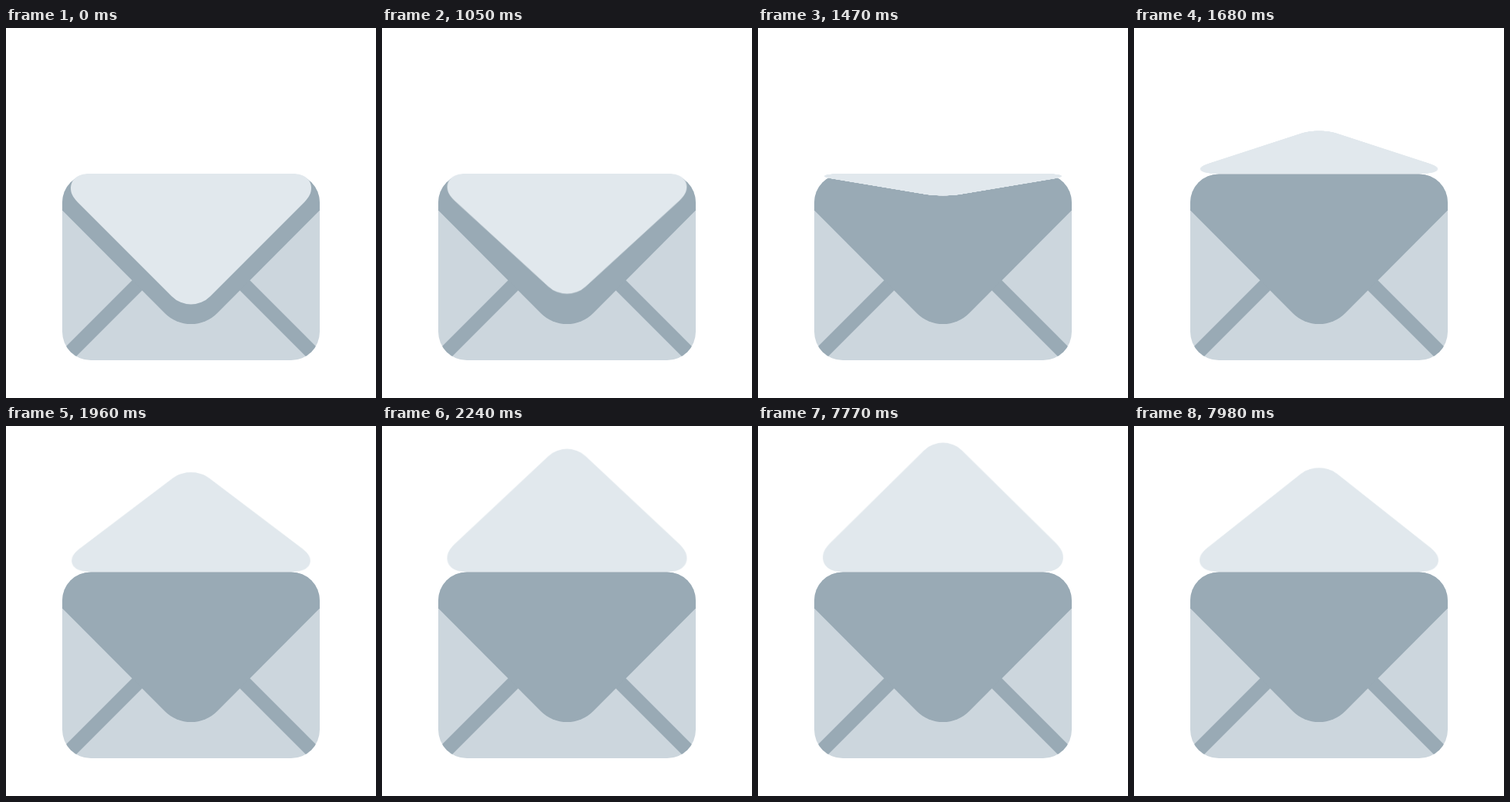
Write an HTML page that moves like this. It is 480 px wide and 480 px high and loops after 8000 ms.

```html
<!DOCTYPE html>
<html lang="en">
<head>
<meta charset="utf-8">
<title>Opening envelope</title>
<style>
  html, body { margin: 0; width: 100%; height: 100%; overflow: hidden; background: #fff; }
  svg { position: absolute; display: block; }
  #envelope { left: 0; top: 0; width: 480px; height: 480px; }
  /* The flap's box starts at the hinge, so it turns about its top edge. */
  #flap { left: 80px; top: 189.4px; width: 320px; height: 172px; transform-origin: 50% 0; }
</style>
</head>
<body>
<svg id="envelope" viewBox="0 0 480 480">
  <clipPath id="body"><rect x="73" y="189.4" width="334" height="241.6" rx="37"/></clipPath>
  <g clip-path="url(#body)">
    <rect x="73" y="189" width="334" height="242" fill="#ccd6dd"/>
    <path d="M66 438L180 324M414 438L300 324" stroke="#99aab5" stroke-width="18.5"/>
    <path d="M73 189H407V236.5L274 370A48 48 0 0 1 206 370L73 236.5Z" fill="#99aab5"/>
  </g>
</svg>
<svg id="flap" viewBox="80 189.4 320 172">
  <path fill="#e1e8ed" d="M108 189.4C92 189.4 84 198 84 208C84 215 87 220 92.5 225.9
    L215.2 348.6A35 35 0 0 0 264.8 348.6L387.5 225.9C393 220 396 215 396 208
    C396 198 388 189.4 372 189.4Z"/>
</svg>
<script>
  const LOOP = 8000, STEP = 70;
  const OPEN_AT = 700, OPEN_TIME = 2100, CLOSE_AT = 7700;
  const flap = document.getElementById('flap');
  const start = performance.now();

  // Ease curve with handles (x1, 0) and (x2, 1), solved by bisection.
  function ease(x, x1, x2) {
    let lo = 0, hi = 1;
    for (let i = 0; i < 24; i++) {
      const u = (lo + hi) / 2, v = 1 - u;
      if (3 * u * v * v * x1 + 3 * u * u * v * x2 + u ** 3 < x) lo = u;
      else hi = u;
    }
    return lo * lo * (3 - 2 * lo);
  }

  function angle(t) {
    if (t <= OPEN_AT) return 0;
    if (t < OPEN_AT + OPEN_TIME) return 180 * ease((t - OPEN_AT) / OPEN_TIME, 0.33, 0.4);
    if (t <= CLOSE_AT) return 180;
    return 180 - 31.8 * ((t - CLOSE_AT) / 280) ** 1.43;
  }

  function draw() {
    const time = (performance.now() - start) % LOOP;
    const held = Math.floor(time / STEP) * STEP;
    flap.style.transform = `perspective(1300px) rotateX(${-angle(held)}deg)`;
    requestAnimationFrame(draw);
  }
  draw();
</script>
</body>
</html>
```
